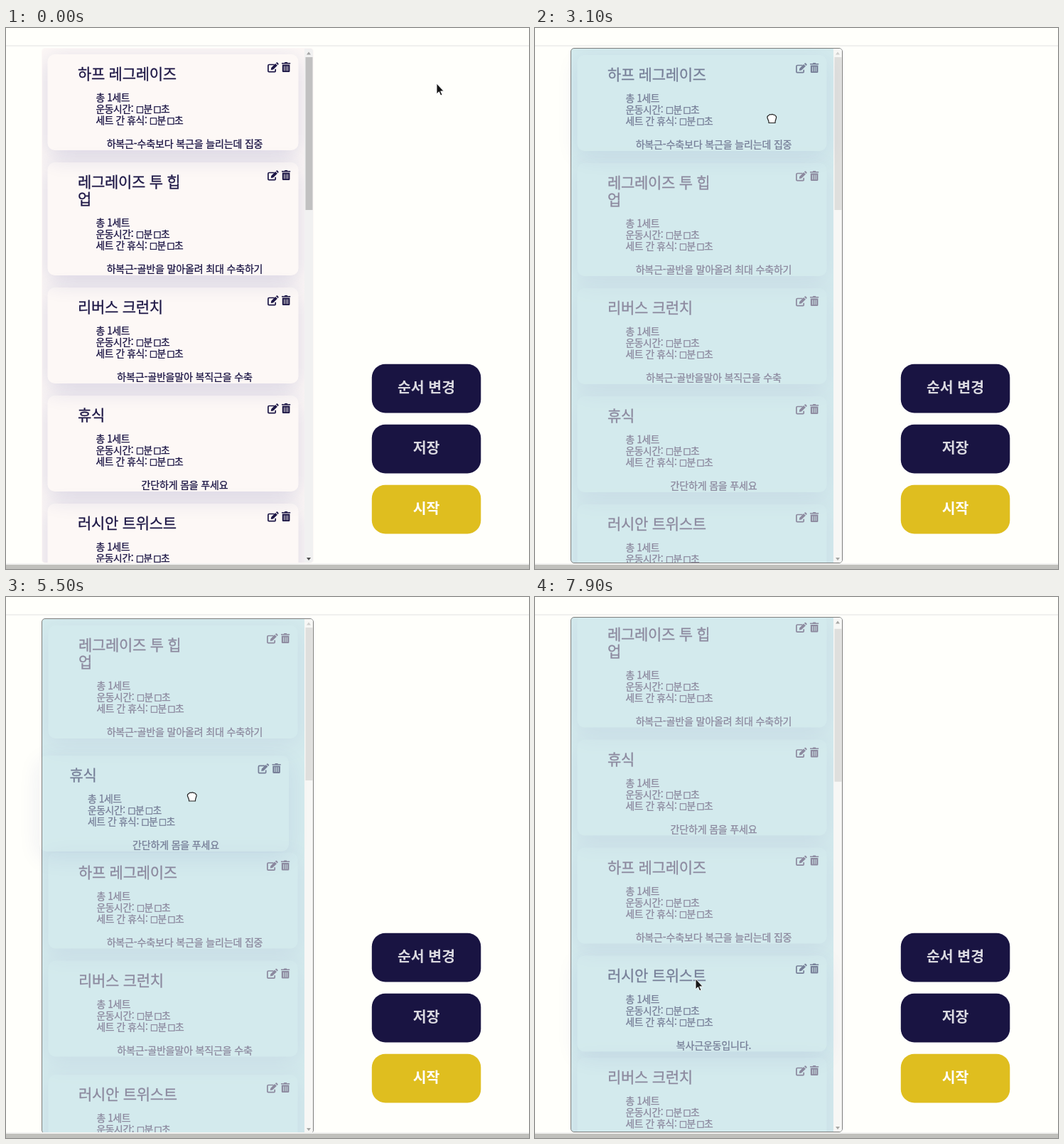
Write an HTML page that moves like this. It is 736 by 761 pixels and loops after 8000 ms.

```html
<!DOCTYPE html>
<html lang="ko">
<head>
<meta charset="utf-8">
<title>운동 순서 변경</title>
<style>
  html, body { margin: 0; width: 100%; height: 100%; overflow: hidden; background: #fffffb; }
  body { position: relative; font-family: "Noto Sans CJK KR", "Noto Sans CJK", "Noto Sans", sans-serif; }
  #page { position: absolute; left: 0; top: 0; width: 736px; height: 753px; overflow: hidden; }
  #list { position: absolute; left: 50px; width: 383px; height: 725px; box-sizing: border-box;
    border: 1px solid transparent; border-radius: 5px; overflow: hidden; }
  #cards { position: absolute; left: -1px; top: -1px; width: 370px; height: 725px; overflow: hidden; }
  #bar { position: absolute; left: 369px; top: -1px; }
  #air { position: absolute; inset: 0; }
  .card { position: absolute; left: 0; top: 0; border-radius: 10px; color: #1d1746;
    box-shadow: 0 8px 32px rgba(31, 38, 135, .16); }
  .card.hover { background: #1d1746; color: #fff; box-shadow: 0 8px 32px rgba(31, 38, 135, .35); }
  .card svg { position: absolute; left: 0; top: 0; overflow: visible; fill: currentColor; }
  .card text { stroke: currentColor; stroke-width: .3px; }
  .title { font-size: 21px; font-weight: 500; letter-spacing: -.3px; }
  .row { font-size: 13.8px; letter-spacing: -.4px; }
  .zero { font: 11.5px "DejaVu Sans", sans-serif; stroke-width: .5px; }
  .note { font-size: 14px; letter-spacing: -.15px; text-anchor: middle; }
  #top { position: absolute; left: 0; top: 0; }
  .label { font-size: 20.5px; font-weight: 700; text-anchor: middle; }
</style>
</head>
<body>
<div id="page">
  <div id="list">
    <div id="cards"></div>
    <svg id="bar" width="13" height="725">
      <rect width="13" height="725" fill="#f1f1f1"/>
      <rect id="thumb" x="1.5" width="10" height="215" fill="#c1c1c1"/>
      <path id="up" d="M3 9.5L6 5.5L9 9.5Z"/>
      <path d="M3 717L6 721L9 717Z" fill="#505050"/>
    </svg>
  </div>
  <div id="air"></div>
</div>
<svg id="top" width="736" height="761">
  <rect y="24" width="736" height="2" fill="#f0f0ee"/>
  <rect y="753" width="736" height="2" fill="#f1f1f0"/>
  <rect y="755" width="736" height="6" fill="#c0c0bc"/>
  <g id="buttons"></g>
  <path id="cursor" stroke-linejoin="round"/>
</svg>
<script>
const LOOP = 8000, STEP = 100, GAP = 17, SHIFT = 143.5;
const $ = id => document.getElementById(id);

const items = [
  [["하프 레그레이즈"], "하복근-수축보다 복근을 늘리는데 집중"],
  [["레그레이즈 투 힙", "업"], "하복근-골반을 말아올려 최대 수축하기"],
  [["리버스 크런치"], "하복근-골반을말아 복직근을 수축"],
  [["휴식"], "간단하게 몸을 푸세요"],
  [["러시안 트위스트"], "복사근운동입니다."]
];

// Card order from a given time on
const orders = [[0, [0, 1, 2, 3, 4]], [4000, [1, 0, 2, 3, 4]], [5900, [1, 3, 0, 2, 4]]];

// Grab, drop and end times; moved cards slide aside by dir at time "slide"
const drags = [
  { id: 0, grab: 3100, drop: 3700, end: 4000, slide: 3300, moved: [1], dir: -1, to: 1 },
  { id: 3, grab: 4900, drop: 5500, end: 5900, slide: 5200, moved: [0, 2], dir: 1, to: 1 },
  { id: 4, grab: 7100, drop: 7600, end: LOOP, slide: 7250, moved: [2], dir: 1, to: 3 }
];

const pointer = [
  [200, 606, 78], [700, 588, 500], [800, 588, 500], [900, 587, 503], [1000, 587, 503],
  [1300, 585, 515], [1600, 585, 515], [1700, 584, 514], [1800, 584, 514], [2000, 583, 513],
  [2300, 583, 513], [2400, 576, 492], [2900, 333, 124], [3100, 333, 124], [3600, 332, 297],
  [4000, 332, 297], [4800, 274, 576], [4900, 274, 576], [5500, 261.5, 277.5],
  [5900, 261.5, 277.5], [6600, 217, 730], [7100, 217, 730], [7500, 226, 537]
];
const pageShift = [[3100, 0], [3600, 3.4], [4900, 3.4], [5500, 1.8], [7100, 1.8], [7500, 0]];
const listScroll = [[7100, 0], [7500, 13.5]];
const listFade = [[1800, 1], [2000, .5]];

const shapes = {
  arrow: ["M0 0V14.8L3.4 11.7L5.7 17L8 16L5.7 10.9H10.2Z", "#151515", "#fff", .9],
  hand: ["M-1.5 8V1.2Q0-.6 1.5 1.2V6L7 7Q9 7.5 9 9.5L8 14.5V16H0V14.5L-5 9.5Q-5.5 7-3.5 7.5Z", "#fff", "#222", 1],
  fist: ["M-6 2.5Q-6.5-.5-4-1Q-3-3-1-2Q1-3.5 2.5-1.8Q4.5-2.5 5.2-.5Q7 0 6.5 2.5L5 7.5V9.5H-4V7.5Z", "#fff", "#222", 1.2]
};

const clamp = x => Math.max(0, Math.min(1, x));
const smooth = x => x * x * (3 - 2 * x);
const mix = (a, b, k) => a + (b - a) * k;
const easeOut = x => 1 - (1 - clamp(x)) ** 4;

function track(keys, t) {
  let i = 0;
  while (i < keys.length - 1 && keys[i + 1][0] <= t) i++;
  const a = keys[i], b = keys[i + 1] || a;
  const k = b === a ? 0 : smooth(clamp((t - a[0]) / (b[0] - a[0])));
  return a.slice(1).map((v, n) => mix(v, b[n + 1], k));
}

const text = (cls, x, y, s) => `<text class="${cls}" x="${x}" y="${y}">${s}</text>`;

// The label face draws its zero as an open box
function timeRow(label, x, y) {
  const pair = (at, unit) =>
    `<tspan class="zero" x="${at - 1}" y="${y - 1}">□</tspan><tspan x="${at + 9.5}" y="${y}">${unit}</tspan>`;
  return text("row", 68, y, label + pair(x, "분") + pair(x + 24.5, "초"));
}

const icons = `
  <path d="M9.5 3H2.4Q.9 3 .9 4.5V12Q.9 13.2 2.1 13.2H10Q11.2 13.2 11.2 12V9.2" fill="none" stroke="currentColor" stroke-width="1.7"/>
  <path d="M5.2 7.4L11.1 1.5L13.9 4.2L8 10.1L4.8 10.5ZM11.9.8L12.7 0Q13.4-.5 14.1.1L15.4 1.4Q16 2 15.4 2.7L14.6 3.5Z"/>
  <path transform="translate(20 -.5)" fill-rule="evenodd" d="M0 1H3.8L4.4 0H7.8L8.4 1H12.2V2.6H0ZM.8 3.6H11.4V12.7Q11.4 14 10.1 14H2.1Q.8 14 .8 12.7ZM3.2 5.4V12.2H4.1V5.4ZM5.7 5.4V12.2H6.6V5.4ZM8.2 5.4V12.2H9.1V5.4Z"/>`;

const cards = items.map(([title, note]) => {
  const extra = (title.length - 1) * 24, h = 135 + extra;
  const el = document.createElement("div");
  el.className = "card";
  el.style.height = h + "px";
  el.innerHTML = `<svg width="353" height="${h}">` +
    title.map((s, i) => text("title", 42.5, 35 + 24 * i, s)).join("") +
    `<g transform="translate(0 ${extra})">` +
    text("row", 68, 66, "총 1세트") + timeRow("운동시간:", 125.5, 82) + timeRow("세트 간 휴식:", 144.5, 98) +
    `</g><g class="mid">${text("note", 193, 131 + extra, note)}</g><g class="icons">${icons}</g></svg>`;
  $("cards").append(el);
  return { el, h, mid: el.querySelector(".mid"), icons: el.querySelector(".icons") };
});

$("buttons").innerHTML = ["순서 변경", "저장", "시작"].map((s, i) => {
  const y = 473 + 85 * i, last = i === 2;
  return `<rect x="514.8" y="${y - .3}" width="153.5" height="68.7" rx="19" fill="${last ? "#dfbe1f" : "#191442"}"/>` +
    `<text class="label" x="591.5" y="${y + 39.5}" fill="${last ? "#fff" : "#dad9e0"}">${s}</text>`;
}).join("");
const [sortBox, sortLabel] = $("buttons").children;

function slots(order, top) {
  const y = [];
  for (const id of order) {
    y[id] = top;
    top += cards[id].h + GAP;
  }
  return y;
}

function setCursor(name, x, y) {
  const [d, fill, stroke, w] = shapes[name], c = $("cursor");
  c.setAttribute("d", d);
  c.setAttribute("fill", fill);
  c.setAttribute("stroke", stroke);
  c.setAttribute("stroke-width", w);
  c.setAttribute("transform", `translate(${x} ${y})`);
}

function draw(t) {
  const [x, y] = track(pointer, t);
  const [shift] = track(pageShift, t), [scroll] = track(listScroll, t), [fade] = track(listFade, t);
  const sorting = t >= 1900, inset = sorting ? 1 : 0;
  const drag = drags.find(d => t >= d.grab && t < d.end);
  const order = orders.filter(o => o[0] <= t).pop()[1];
  const top = 37 + inset + shift - scroll;
  const pos = slots(order, top);
  const left = 58.5 + inset;
  let dragX = left;

  if (drag) {
    const slide = easeOut((t - drag.slide) / 200) * SHIFT * drag.dir;
    for (const id of drag.moved) pos[id] += slide;
    const [gx, gy] = track(pointer, drag.grab);
    const startTop = slots(order, 38 + track(pageShift, drag.grab)[0])[drag.id];
    const rest = order.filter(id => id !== drag.id);
    rest.splice(drag.to, 0, drag.id);
    const k = easeOut((t - drag.drop) / 300);
    pos[drag.id] = mix(startTop + y - gy, slots(rest, top)[drag.id], k);
    dragX = mix(left + x - gx, left, k);
  }

  const list = $("list").style;
  list.top = 28 + shift + "px";
  list.opacity = $("air").style.opacity = fade;
  list.borderColor = sorting ? "#000" : "transparent";
  list.backgroundColor = drag ? "#a9d7e0" : "#fdf8f6";
  $("thumb").setAttribute("y", 13 + scroll * .28);
  $("up").setAttribute("fill", scroll > 0 ? "#505050" : "#a3a3a3");

  cards.forEach((c, id) => {
    const held = drag && drag.id === id;
    const home = held ? $("air") : $("cards");
    if (c.el.parentNode !== home) home.append(c.el);
    const cx = held ? dragX : left - 50;
    const cy = held ? pos[id] : pos[id] - 28 - shift;
    const over = sorting && !drag && x > left && x < 410 && y > pos[id] && y < pos[id] + c.h;
    c.el.style.width = 353 - 2 * inset + "px";
    c.el.style.transform = `translate(${cx}px, ${cy}px)`;
    c.el.classList.toggle("hover", over);
    c.mid.setAttribute("transform", `translate(${-inset} 0)`);
    c.icons.setAttribute("transform", `translate(${309.5 - 2 * inset} 11.5)`);
  });

  const onButton = x > 515 && x < 668 && y > 473 && y < 541;
  sortBox.setAttribute("fill", onButton ? "#eb0034" : "#191442");
  sortLabel.setAttribute("fill", onButton ? "#fff" : "#dad9e0");
  sortLabel.setAttribute("stroke", onButton ? "#fff" : "none");
  sortLabel.setAttribute("stroke-width", .6);
  setCursor(onButton ? "hand" : drag && t <= drag.drop ? "fist" : "arrow", x, y);
}

const start = performance.now();
function tick() {
  const t = (performance.now() - start) % LOOP;
  draw(Math.floor(t / STEP) * STEP);
  requestAnimationFrame(tick);
}
tick();
</script>
</body>
</html>
```
